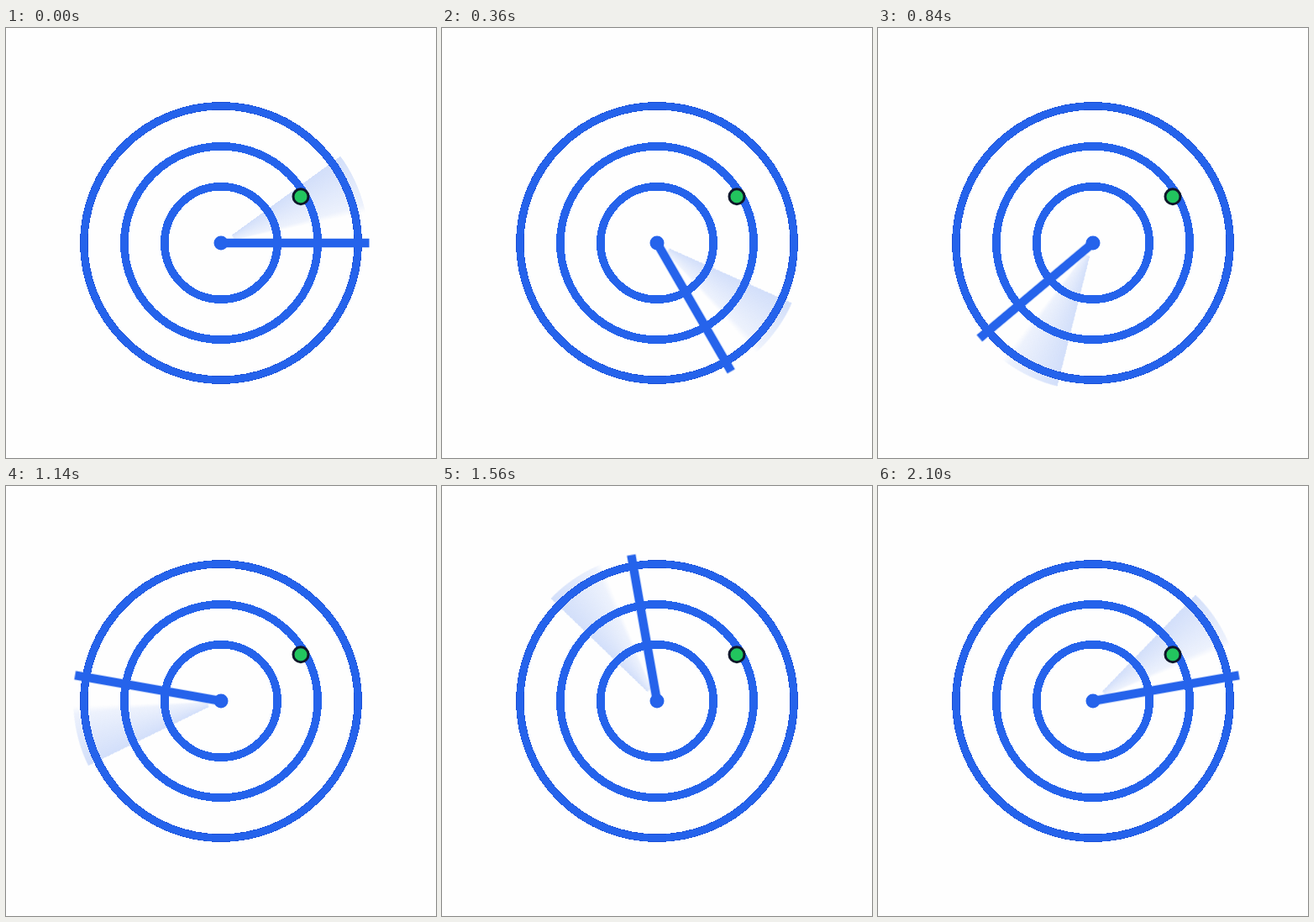
An HTML page that plays this animation: 512x512 px, repeating every 2.16 s.

```html
<!DOCTYPE html>
<html lang="en">
<head>
<meta charset="utf-8">
<title>Radar sweep</title>
<style>
  html, body {
    margin: 0;
    width: 100%;
    height: 100%;
    overflow: hidden;
    background: #fefefe;
  }
  .stage {
    position: relative;
    width: 512px;
    height: 512px;
  }
  svg {
    position: absolute;
    inset: 0;
  }
  .trail, .arm {
    animation: sweep 2160ms steps(36) infinite;
  }
  /* The trail lags the arm and fades towards it. */
  .trail {
    position: absolute;
    left: 80px;
    top: 80px;
    width: 352px;
    height: 352px;
    border-radius: 50%;
    background: conic-gradient(from 54deg,
      rgb(37 99 235 / .2) 0deg, rgb(37 99 235 / .08) 21deg,
      rgb(37 99 235 / 0) 24deg);
    -webkit-mask: radial-gradient(circle, transparent 15px, #000 17px);
    mask: radial-gradient(circle, transparent 15px, #000 17px);
  }
  .rings, .arm {
    fill: none;
    stroke: #2563eb;
  }
  .rings {
    stroke-width: 9.6;
    shape-rendering: crispEdges;
  }
  .rings .edge {
    stroke: #1a4fd6;
  }
  .rings .core {
    stroke-width: 8.4;
  }
  .arm {
    stroke-width: 10.4;
    transform-origin: 256px 256px;
  }
  @keyframes sweep {
    to { transform: rotate(360deg); }
  }
</style>
</head>
<body>
<div class="stage">
  <div class="trail"></div>
  <svg width="512" height="512" viewBox="0 0 512 512">
    <g class="rings">
      <circle class="edge" cx="256" cy="256" r="163.2"/>
      <circle class="core" cx="256" cy="256" r="163.2"/>
      <circle cx="256" cy="256" r="115.2"/>
      <circle cx="256" cy="256" r="67.2"/>
    </g>
    <path class="arm" d="M256 256H432.5"/>
    <circle cx="256" cy="256" r="8.5" fill="#2563eb"/>
    <circle cx="351" cy="200.7" r="9" fill="#22c55e" stroke="#0f172a" stroke-width="3"/>
  </svg>
</div>
</body>
</html>
```
